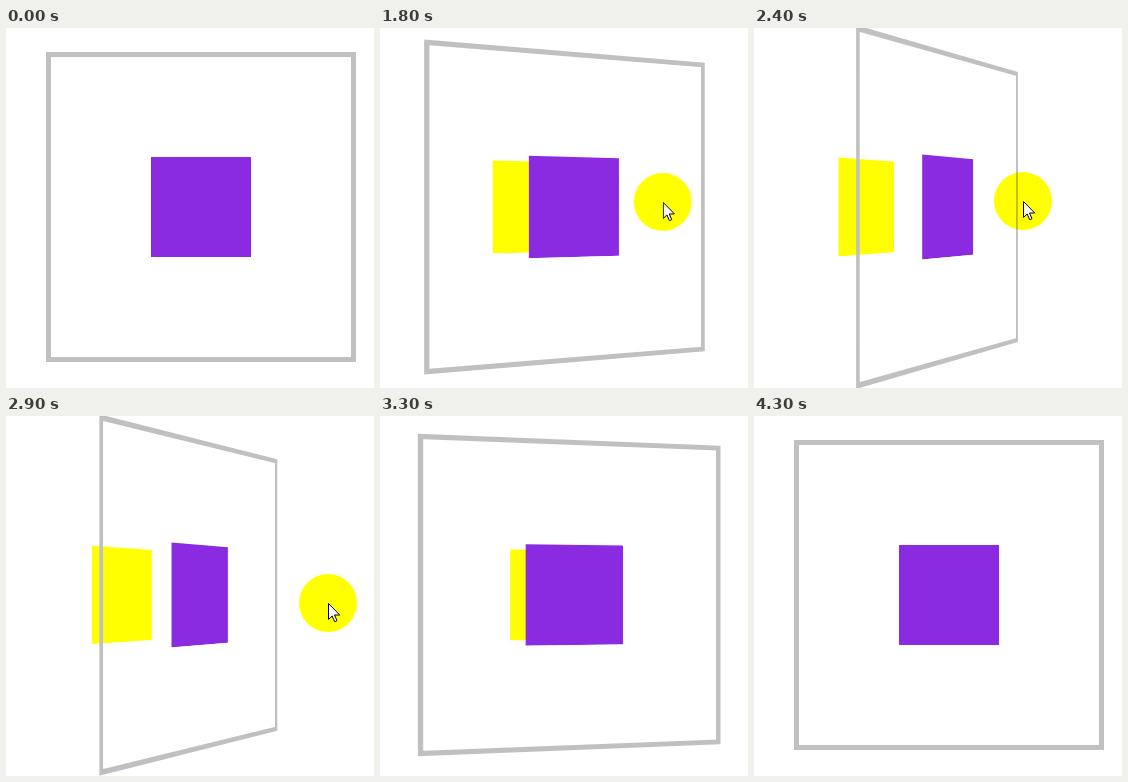
Animation, 368 px wide and 360 px high, one loop 4400 ms. Source, as an HTML page:

```html
<!DOCTYPE html>
<html lang="en">
<head>
<meta charset="utf-8">
<title>Rotating box</title>
<style>
  html, body { margin: 0; width: 100%; height: 100%; overflow: hidden; background: #fff; }
  #stage {
    position: relative; width: 368px; height: 360px; overflow: hidden; background: #fff;
    perspective: 900px; perspective-origin: 195px 179px;
  }
  #stage > * { position: absolute; }
  #box {
    left: 40px; top: 24px; width: 310px; height: 310px; box-sizing: border-box;
    border: 5px solid #c0c0c0; transform-style: preserve-3d;
  }
  #box div { position: absolute; left: 100px; top: 100px; width: 100px; height: 100px; }
  .back { background: #ff0; transform: translateZ(-100px); }
  .front { background: #8a2be2; }
  #halo {
    left: -29px; top: -29px; width: 58px; height: 58px; border-radius: 50%;
    background: #ff0; mix-blend-mode: multiply;
  }
  #arrow { left: 0; top: 0; }
</style>
</head>
<body>
<div id="stage">
  <div id="box"><div class="back"></div><div class="front"></div></div>
  <div id="halo"></div>
  <svg id="arrow" width="14" height="21">
    <path d="M.5.5V16.5L4.2 13L6.7 18.7L9 17.7L6.5 12H11.7Z" fill="#fff" stroke="#000"/>
  </svg>
</div>
<script>
const LOOP = 4400, STEP = 100, TURN = 60;
const box = document.getElementById('box');
const pointer = [document.getElementById('halo'), document.getElementById('arrow')];

const clamp = x => Math.min(1, Math.max(0, x));
const mix = (a, b, k) => a + (b - a) * k;
const smooth = x => x * x * (3 - 2 * x);

// CSS "ease": cubic-bezier(.25, .1, .25, 1)
function ease(x) {
  const curve = (a, b, s) => 3 * (1 - s) ** 2 * s * a + 3 * (1 - s) * s * s * b + s ** 3;
  let lo = 0, hi = 1;
  for (let i = 0; i < 24; i++) {
    const mid = (lo + hi) / 2;
    if (curve(.25, .25, mid) < x) lo = mid; else hi = mid;
  }
  return curve(.1, 1, lo);
}

const turnSince = (t, start) => ease(clamp((t - start) / 1000));

function pointerAt(t) {
  if (t < 1500 || t >= 3100) return null;
  if (t < 2800) {
    const k = smooth(clamp((t - 1500) / 400));
    return [mix(357, 269, k), mix(179, 173, k)];
  }
  const k = (t - 2800) / 100;
  return [269 + 53 * k, 173 + 14 * k];
}

function draw(now) {
  const t = Math.floor(now % LOOP / STEP) * STEP;
  const angle = TURN * (turnSince(t, 1540) - turnSince(t, 2817));
  box.style.transform = `rotateY(${angle}deg)`;

  const pos = pointerAt(t);
  for (const el of pointer) {
    el.style.visibility = pos ? 'visible' : 'hidden';
    if (pos) el.style.transform = `translate(${pos[0]}px, ${pos[1]}px)`;
  }
}

const start = performance.now();
function tick() {
  draw(performance.now() - start);
  requestAnimationFrame(tick);
}
tick();
</script>
</body>
</html>
```
